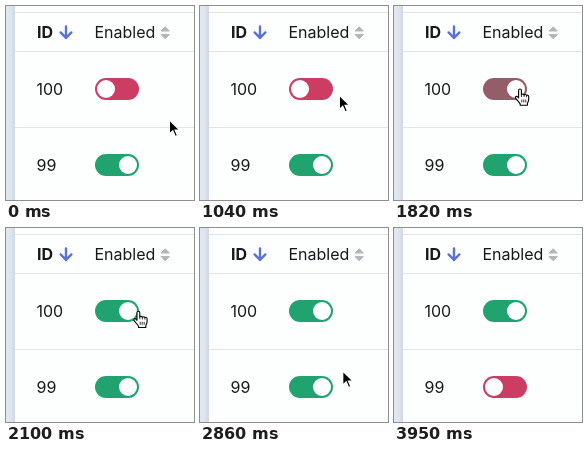
Animation of 188 by 194 pixels, one loop 5060 ms. Source, as an HTML page:

```html
<!DOCTYPE html>
<html lang="en">
<head>
<meta charset="utf-8">
<title>Toggle table</title>
<style>
  html, body { margin: 0; width: 100%; height: 100%; overflow: hidden; background: #fdfefe; }
  svg { display: block; width: 188px; height: 194px; }
  text { font: 16px Inter, "Open Sans", sans-serif; fill: #17181c; }
  .bold { font-weight: 700; }
</style>
</head>
<body>
<svg viewBox="0 0 188 194">
  <defs>
    <linearGradient id="edge">
      <stop offset="0" stop-color="#e1e8f0"/>
      <stop offset=".55" stop-color="#dde4ed"/>
      <stop offset="1" stop-color="#d0d7e1"/>
    </linearGradient>
  </defs>
  <rect width="188" height="194" fill="#fdfefe"/>
  <rect width="9" height="194" fill="url(#edge)"/>
  <path d="M9 6.5H188M9 45.5H188M9 121.5H188" stroke="#e1e5e9"/>

  <text class="bold" x="31" y="32">ID</text>
  <path d="M60 20.5V32M54.6 26.4L60 31.8L65.4 26.4" fill="none" stroke="#5a72d6" stroke-width="2.4" stroke-linecap="round" stroke-linejoin="round"/>
  <text x="88.5" y="32">Enabled</text>
  <path d="M155 25L159.2 20.8L163.4 25ZM155 28.6L159.2 32.8L163.4 28.6Z" fill="#b1b5bc" stroke="#b1b5bc" stroke-linejoin="round"/>
  <text x="30.5" y="89">100</text>
  <text x="30.5" y="165">99</text>

  <g id="first" transform="translate(89 72)">
    <rect width="44" height="22" rx="11"/><circle cy="11" r="9" fill="#fff"/>
  </g>
  <g id="second" transform="translate(89 148)">
    <rect width="44" height="22" rx="11"/><circle cy="11" r="9" fill="#fff"/>
  </g>

  <g id="arrow">
    <path d="M0 0V16L3.7 12.5L6.1 18L9 16.8L6.7 11.5H11.6Z" fill="#fff"/>
    <path d="M1 2.4V13.6L4 10.8L6.6 16.7L7.7 16.2L5.2 10.4H9.2Z" fill="#000"/>
  </g>
  <g id="hand">
    <g transform="translate(-5.4 -.5)" stroke="#000" stroke-width="1.1" stroke-linejoin="round">
      <path d="M4 9.5V1.9a1.4 1.4 0 0 1 2.8 0V6.3c.2-1 2.4-1 2.6.2 .4-.9 2.3-.8 2.5.5 .6-.8 2.2-.4 2.2 1V11c0 2-1 2.6-1.3 4.2V16.7H5.6V15.4C4.6 13.8 2.6 12 1 9.6 .3 8.2 1.8 7.4 2.8 8.2Z" fill="#fff"/>
      <path d="M6.8 6.3V8.5M9.4 6.5V8.6M11.9 7V8.8M7.2 11V14M9.2 11V14M11.2 11V14" fill="none" stroke-width=".8"/>
    </g>
  </g>
</svg>
<script>
const LOOP = 5060;
const RED = [205, 60, 99], GREEN = [33, 163, 111];
const $ = id => document.getElementById(id);
const arrow = $('arrow'), hand = $('hand');

// Pointer hot spot: time, x, y
const path = [
  [0, 163, 113], [630, 163, 113], [1040, 139, 88.5], [1140, 133.5, 84],
  [1170, 133, 84], [1320, 126, 83], [1950, 126, 83], [2210, 137, 83.5],
  [2270, 137, 83.5], [2490, 149, 101], [2640, 150, 119], [2770, 148.5, 134],
  [2800, 147, 136], [2860, 142.5, 142], [3110, 106.5, 160.5],
  [3660, 106.5, 160.5], [3950, 105, 197], [LOOP, 105, 197]
];

const mix = (a, b, p) => a + (b - a) * p;
const ramp = (t, start, length, from) =>
  t < start ? 0 : Math.min(1, from + (1 - from) * (t - start) / length);

function pointer(t) {
  const i = path.findIndex(p => p[0] > t);
  const a = path[i - 1], b = path[i];
  const p = (t - a[0]) / (b[0] - a[0]);
  return [mix(a[1], b[1], p), mix(a[2], b[2], p)];
}

function setToggle(id, knob, color) {
  const [track, dot] = $(id).children;
  const rgb = RED.map((c, i) => Math.round(mix(c, GREEN[i], color)));
  track.setAttribute('fill', `rgb(${rgb})`);
  dot.setAttribute('cx', mix(11, 33, knob));
}

const over = (x, y) => x >= 89 && x <= 133 &&
  (Math.abs(y - 83) < 11 || Math.abs(y - 159) < 11);

function draw(t) {
  setToggle('first', ramp(t, 1740, 80, .25), ramp(t, 1740, 280, .05));
  setToggle('second', 1 - ramp(t, 3520, 80, .23), 1 - ramp(t, 3520, 240, .25));

  const [x, y] = pointer(t);
  const pointing = t > 1170 && over(x, y);
  for (const [node, shown] of [[arrow, !pointing], [hand, pointing]]) {
    node.setAttribute('transform', `translate(${x} ${y})`);
    node.setAttribute('visibility', shown ? 'visible' : 'hidden');
  }
}

const start = performance.now();
function tick() {
  draw((performance.now() - start) % LOOP);
  requestAnimationFrame(tick);
}
tick();
</script>
</body>
</html>
```
